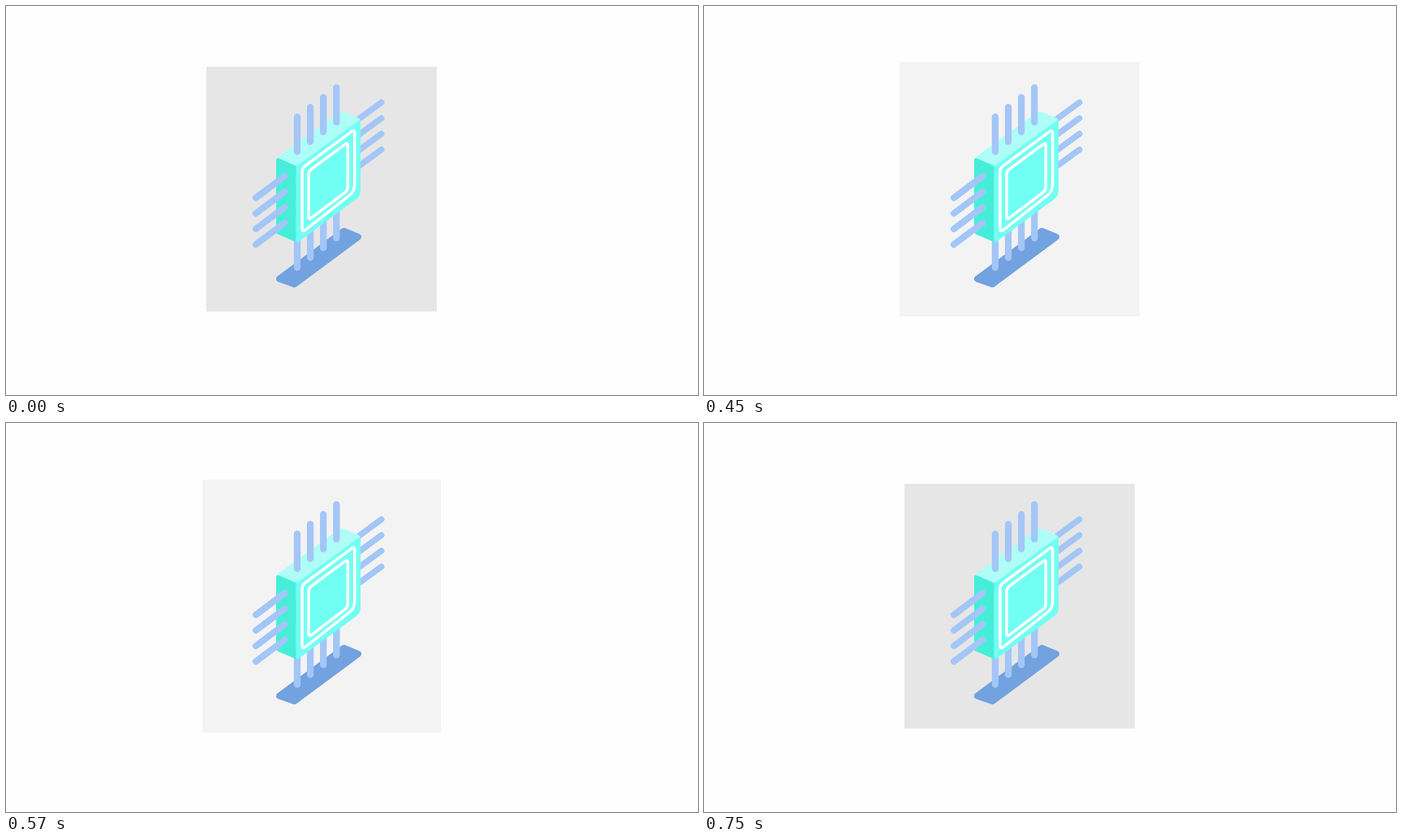
An HTML page that plays this animation: 853 px wide and 480 px high, repeating every 1.01 s.

```html
<!DOCTYPE html>
<html lang="en">
<head>
<meta charset="utf-8">
<title>Chip card</title>
<style>
  html, body { margin: 0; width: 100%; height: 100%; overflow: hidden; background: #fefefe; }
  .card {
    position: absolute; left: 247px; top: 75px; width: 284px; height: 302px;
    background: currentColor;
    animation: pulse 1010ms step-end infinite;
  }
  svg { position: absolute; left: 0; top: 0; }
  .pins { stroke: #a3c6f7; stroke-width: 8.3; stroke-linecap: round; }
  #left { stroke-width: 8; }
  #right { stroke-width: 7.5; }
  .trace { fill: none; stroke: #fff; stroke-width: 3.5; stroke-linejoin: round; }

  /* The card grows by its shadow spread and lightens, in hard steps of 60 ms. */
  @keyframes pulse {
    0%      { color: #e6e6e6; box-shadow: 0 0 0 0 }
    32.673% { color: #eeeeee; box-shadow: 0 0 0 2px }
    38.614% { color: #f1f1f1; box-shadow: 0 0 0 4px }
    44.554% { color: #f3f3f3; box-shadow: 0 0 0 6px }
    50.495% { color: #f3f3f3; box-shadow: 0 0 0 7px }
    56.436% { color: #f3f3f3; box-shadow: 0 0 0 5px }
    62.376% { color: #f3f3f3; box-shadow: 0 0 0 3px }
    68.317% { color: #ececec; box-shadow: 0 0 0 1px }
    74.257%, 100% { color: #e6e6e6; box-shadow: 0 0 0 0 }
  }
</style>
</head>
<body>
<div class="card"></div>
<svg width="853" height="480" viewBox="0 0 853 480">
  <defs>
    <path id="bottom" d="M359 250V322.5"/>
    <path id="top" d="M359 137V179.5"/>
    <path id="left" d="M308 236.7L343.5 210"/>
    <path id="right" d="M462.7 119L430 143"/>
  </defs>

  <path d="M337 336.700L416.500 277.700L434 285L355.500 343.300Z" fill="#72a2df" stroke="#72a2df" stroke-width="8" stroke-linejoin="round"/>

  <g class="pins">
    <use href="#bottom"/>
    <use href="#bottom" x="16.1" y="-12.1"/>
    <use href="#bottom" x="32.2" y="-24.2"/>
    <use href="#bottom" x="48.3" y="-36.3"/>
    <use href="#right"/>
    <use href="#right" y="19.4"/>
    <use href="#right" y="38.8"/>
    <use href="#right" y="58.2"/>
  </g>

  <path d="M334 187L410 131.700Q413 129.500 417 131L434 138Q437 139.500 437 143L358 200Z" fill="#aefdf7"/>
  <path d="M333 190Q333 186.500 337 188.200L358 197.500V291.500L336 282Q333 280.500 333 277Z" fill="#46eed9"/>
  <path d="M357.500 198L434 142Q437 140 437 144V228Q437 234.500 431.500 238.500L361 290.500Q357.500 292.500 357.500 289Z" fill="#72fff3"/>

  <path class="trace" d="M365 205Q365 200 369 197L426 154.800Q429.700 152.300 429.700 156.500V220Q429.700 228.500 423.500 233.500L369 276.300Q365 279 365 275Z"/>
  <path class="trace" d="M373 208.500Q373 204 376 201.700L418 170.700Q421.300 168.500 421.300 172V222.500Q421.300 227.500 418 230L376 261.800Q373 263.700 373 260.500Z"/>

  <g class="pins">
    <use href="#top"/>
    <use href="#top" x="16.1" y="-12.1"/>
    <use href="#top" x="32.2" y="-24.2"/>
    <use href="#top" x="48.3" y="-36.3"/>
    <use href="#left"/>
    <use href="#left" y="19.2"/>
    <use href="#left" y="38.4"/>
    <use href="#left" y="57.6"/>
  </g>
</svg>
</body>
</html>
```
